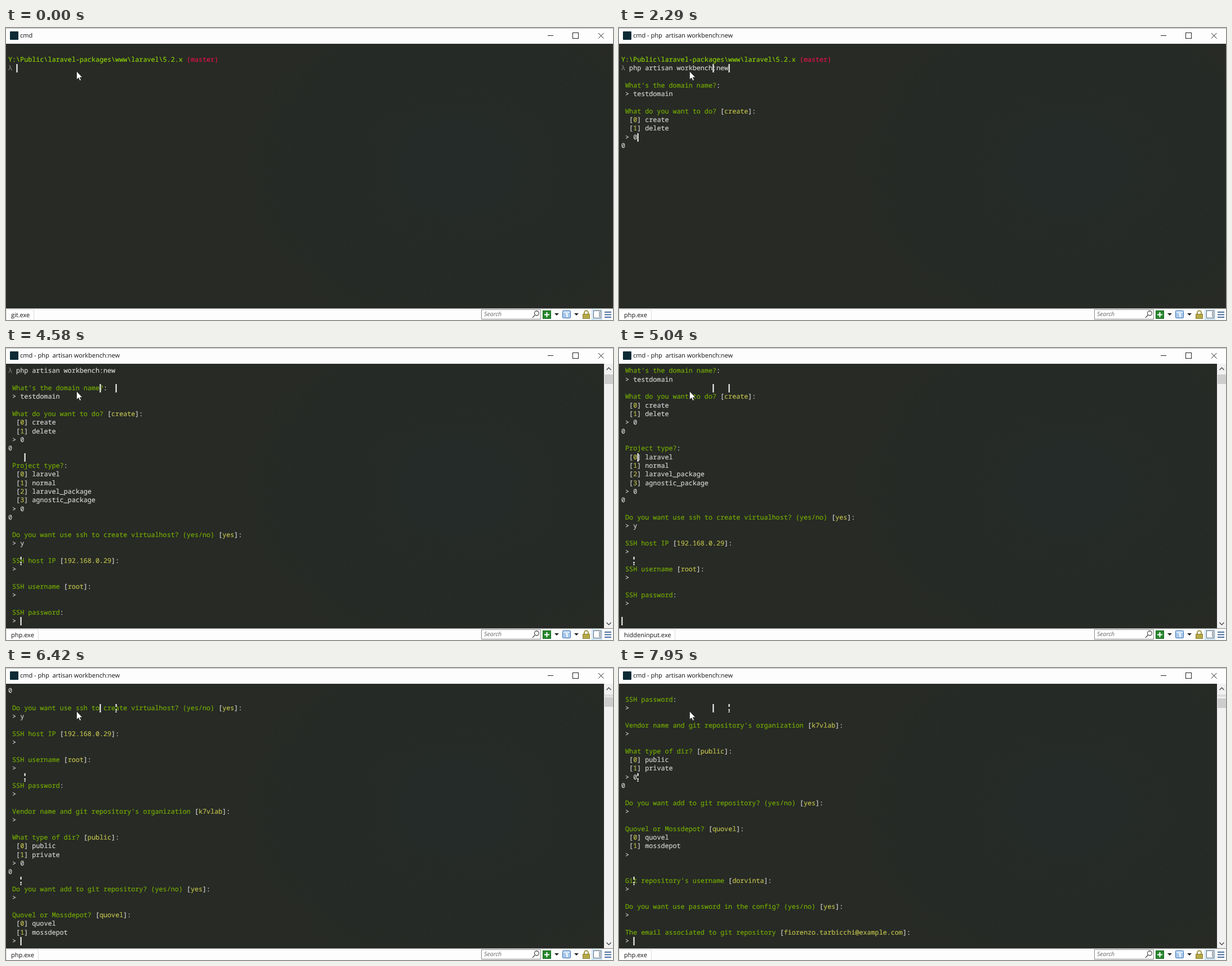
An HTML page for the animation above (8000 ms loop, 1078x519 px).

```html
<!DOCTYPE html>
<html lang="en">
<head>
<meta charset="utf-8">
<title>Terminal session</title>
<style>
html, body { margin: 0; width: 100%; height: 100%; overflow: hidden; background: #fdfdfd; }
#stage { position: relative; width: 1078px; height: 519px; overflow: hidden; }
#stage > *, .row, .caret { position: absolute; }
#term {
  left: 0; top: 28px; width: 1078px; height: 471px; overflow: hidden; color: #d2d2d2;
  background: radial-gradient(ellipse 420px 330px at 800px 220px, #252b29, #272a25);
}
.row {
  left: 4px; height: 15.33px; white-space: pre;
  font: 11.74px/15.33px "Noto Sans Mono", "DejaVu Sans Mono", monospace;
  text-rendering: geometricPrecision; font-variant-ligatures: none;
  -webkit-text-stroke: .2px currentColor;
}
i { font-style: normal; }
.path { color: #8dd006; } .branch { color: #e3124a; } .dim { color: #7c7c7c; }
.ask { color: #74aa04; } .pick { color: #bebe4c; }
.caret { left: 0; top: 0; width: 2px; height: 15px; background: #fff; }
.caret.cut { background: linear-gradient(#fff 0 5px, transparent 5px 9px, #fff 9px 12px, transparent 12px 13px, #fff 13px); }
.ui { font: 11px/16px "Open Sans", "Noto Sans", sans-serif; white-space: pre; color: #111; text-rendering: geometricPrecision; }
#title { left: 25px; top: 6px; }
#tab {
  left: 0; top: 500px; height: 18px; line-height: 20px; padding: 0 7px 0 8px;
  background: #fff; border: 1px solid #dcdcdc;
}
#search { left: 849px; top: 501px; font-size: 10.5px; font-style: italic; color: #666; }
svg { left: 0; top: 0; }
</style>
</head>
<body>
<div id="stage">
  <div id="term"></div>
  <svg id="chrome" width="1078" height="519" fill="none">
    <path d="M0 .5H1078" stroke="#b4b4b4"/>
    <rect x="7" y="6" width="15" height="15" rx="1" fill="#0b2a36"/>
    <g stroke="#222">
      <path d="M962 13.500h10M1052 9l9.500 9.500m0-9.500l-9.500 9.500"/>
      <rect x="1006.500" y="8.500" width="10" height="10"/>
    </g>
    <g id="bar">
      <rect x="1062" y="28" width="16" height="471" fill="#f1f1f1"/>
      <path d="M1066.500 39l4-4 4 4M1066.500 488l4 4 4-4" stroke="#505050" stroke-width="1.500"/>
      <rect id="trail" x="1063" y="47" width="15" height="4" fill="#dcdcdc"/>
      <rect id="thumb" x="1063" width="15" height="17" fill="#cdcdcd"/>
    </g>
    <path d="M0 498.500H1078" stroke="#808280"/>
    <rect x="844.500" y="500.500" width="105" height="17" fill="#fff" stroke="#8a8a8a"/>
    <g stroke="#555" stroke-width="1.300"><circle cx="942.500" cy="507" r="4"/><path d="M939.500 510l-4.500 5"/></g>
    <rect x="953.500" y="502.500" width="14" height="14" fill="#26852b" stroke="#176b20"/>
    <path d="M960.500 505v9M956 509.500h9" stroke="#fff" stroke-width="2"/>
    <path d="M974 507h8l-4 4zM1009 507h8l-4 4z" fill="#222"/>
    <rect x="988.500" y="502.500" width="14" height="13" rx="1" fill="#a9c8ec" stroke="#3f74b4"/>
    <path d="M990 505h11" stroke="#e8f2fc" stroke-width="2"/>
    <path d="M994 508h2.500v6" stroke="#fff" stroke-width="2"/>
    <path d="M1027 509v-3a3.500 3.500 0 0 1 7 0v3" stroke="#a29a4a" stroke-width="2"/>
    <rect x="1024.500" y="508.500" width="12" height="8" fill="#b5a846" stroke="#8b8136"/>
    <rect x="1040.500" y="500.500" width="18" height="18" fill="#d9eafa" stroke="#c2dcf3"/>
    <rect x="1043.500" y="502.500" width="13" height="13" fill="#fff" stroke="#5d6874"/>
    <path d="M1054 504v10" stroke="#9aa4af" stroke-width="2"/>
    <path d="M1063 505h12M1063 509.500h12M1063 514h12" stroke="#486f9f" stroke-width="2"/>
    <path d="M125.500 77v14.500l3.300-3 2.300 5 2.200-1-2.200-4.700h4.400z" fill="#fff" stroke="#1c1e1b" stroke-width=".6"/>
  </svg>
  <div id="title" class="ui"></div>
  <div id="tab" class="ui"></div>
  <div id="search" class="ui">Search</div>
</div>
<script>
const LOOP = 8000, PITCH = 15.33, CELL = 7.044, TOP = 5.4;
const $ = id => document.getElementById(id);
const term = $('term');

const tint = (kind, s) => `<i class="${kind}">${s}</i>`;
const ask = (s, preset) => ' ' + tint('ask', s) + (preset ? ` [${tint('pick', preset)}]:` : ':');
const options = names => names.map((name, n) => `  [${tint('pick', n)}] ${name}`);

const rows = [], typed = [], carets = [];

function put(line, at, ...texts) {
  texts.forEach((html, k) => {
    const el = document.createElement('div');
    el.className = 'row';
    el.innerHTML = html;
    term.append(el);
    rows.push({ el, line: line + k, at });
  });
}

function type(text, times) {
  const el = document.createElement('i');
  rows[rows.length - 1].el.append(el);
  typed.push({ el, text, times });
}

// row and column are screen cells; a cut caret is one partly overwritten by text
function caret(from, to, row, col, cut = false) {
  const el = document.createElement('div');
  el.className = cut ? 'caret cut' : 'caret';
  el.style.transform = `translate(${4.4 + col * CELL}px, ${Math.round(TOP + row * PITCH)}px)`;
  term.append(el);
  carets.push({ el, from, to });
}

// The caret walks along with the typed characters.
function follow(row, col, from, times, to) {
  [from, ...times].forEach((t, k) => caret(t, times[k] ?? to, row, col + k));
}

const every = (start, step, count) => Array.from({ length: count }, (_, k) => start + k * step);

put(1, 0, tint('path', 'Y:\\Public\\laravel-packages\\www\\laravel\\5.2.x') + ' ' + tint('branch', '(master)'));
put(2, 0, tint('dim', 'λ') + ' ');
const command = [...every(50, 39, 21), ...every(940, 40, 4)];
type('php artisan workbench:new', command);
follow(2, 2, 0, command, 1110);

put(4, 1340, ask("What's the domain name?"), ' > ');
const domain = every(1420, 350 / 9, 10);
type('testdomain', domain);
follow(5, 3, 1340, domain, 1850);

put(7, 1900, ask('What do you want to do?', 'create'), ...options(['create', 'delete']), ' > ');
type('0', [2060]);
put(11, 2290, '0');
put(13, 2370, ask('Project type?'), ...options(['laravel', 'normal', 'laravel_package', 'agnostic_package']), ' > ');
type('0', [2830]);
put(19, 3130, '0');
put(21, 3210, ask('Do you want use ssh to create virtualhost? (yes/no)', 'yes'), ' > ');
type('y', [3750]);
put(24, 3980, ask('SSH host IP', '192.168.0.29'), ' >');
put(27, 4280, ask('SSH username', 'root'), ' >');
put(30, 4580, ask('SSH password'), ' >');
put(33, 5120, ask("Vendor name and git repository's organization", 'k7vlab'), ' >');
put(36, 5430, ask('What type of dir?', 'public'), ...options(['public', 'private']), ' > ');
type('0', [5580]);
put(40, 5730, '0');
put(42, 5880, ask('Do you want add to git repository? (yes/no)', 'yes'), ' >');
put(45, 6420, ask('Quovel or Mossdepot?', 'quovel'), ...options(['quovel', 'mossdepot']), ' >');
put(51, 6580, ask("Git repository's username", 'dorvinta'), ' >');
put(54, 7720, ask('Do you want use password in the config? (yes/no)', 'yes'), ' >');
put(57, 7950, ask('The email associated to git repository', 'fiorenzo.tarbicchi@example.com'), ' >');

// Carets left behind on the screen and the live ones: from, to, row, column, cut
[
  [940, LOOP, 2, 23], [1110, 5120, 2, 27], [5120, LOOP, 2, 27, true],
  [1900, 2060, 10, 3], [2060, 6420, 10, 4], [6420, LOOP, 10, 4, true],
  [2370, 2830, 18, 3], [2830, 3130, 18, 4],
  [3210, 3750, 22, 3], [3750, LOOP, 22, 3, true], [3750, 3980, 22, 4],
  [3980, 4280, 25, 3], [4280, 4580, 28, 3], [4580, 4810, 29, 3],
  [5040, 5120, 29, 0], [5120, 5350, 29, 3], [5430, 5580, 29, 3],
  [5580, 5880, 29, 3, true], [5580, 5730, 29, 4], [5730, 5880, 29, 0],
  [5880, 6030, 29, 3], [6030, 6420, 29, 3, true], [6420, 6810, 29, 3],
  [6810, 7640, 29, 3, true], [7720, LOOP, 29, 3]
].forEach(c => caret(...c));

const scrolls = [[0, 0], [4580, 2], [5040, 4], [5120, 5], [5350, 6], [5430, 10], [5730, 12], [5880, 14],
  [6420, 19], [6500, 21], [6580, 23], [7640, 24], [7720, 26], [7950, 29]];
const titles = [[0, 'cmd'], [1180, 'cmd - php  artisan workbench:new']];
const tabs = [[0, 'git.exe'], [1180, 'php.exe'], [1850, 'cmd.exe'], [1980, 'php.exe'], [2370, 'cmd.exe'],
  [2520, 'php.exe'], [3210, 'cmd.exe'], [3360, 'php.exe'], [4660, 'hiddeninput.exe'], [5120, 'php.exe'],
  [6500, 'cmd.exe'], [6580, 'php.exe']];

const valueAt = (steps, t) => steps.findLast(([at]) => at <= t)[1];
const show = (el, on) => { el.style.visibility = on ? 'visible' : 'hidden'; };
const write = (el, s) => { if (el.textContent !== s) el.textContent = s; };

function render(t) {
  const scroll = valueAt(scrolls, t);
  for (const { el, line, at } of rows) {
    const row = line - scroll;
    show(el, t >= at && row >= 0 && row < 30);
    el.style.top = Math.round(TOP + row * PITCH) + 'px';
  }
  for (const { el, text, times } of typed) write(el, text.slice(0, times.filter(at => at <= t).length));
  for (const { el, from, to } of carets) show(el, t >= from && t < to);
  write($('title'), valueAt(titles, t));
  write($('tab'), valueAt(tabs, t));
  const barOn = t >= 4580 && (t < 4810 || t >= 5040);
  show($('bar'), barOn);
  show($('trail'), barOn && scroll >= 19);
  $('thumb').setAttribute('y', Math.round(46 + scroll * 0.29));
}

const start = performance.now();
function tick() {
  render((performance.now() - start) % LOOP);
  requestAnimationFrame(tick);
}
tick();
</script>
</body>
</html>
```
